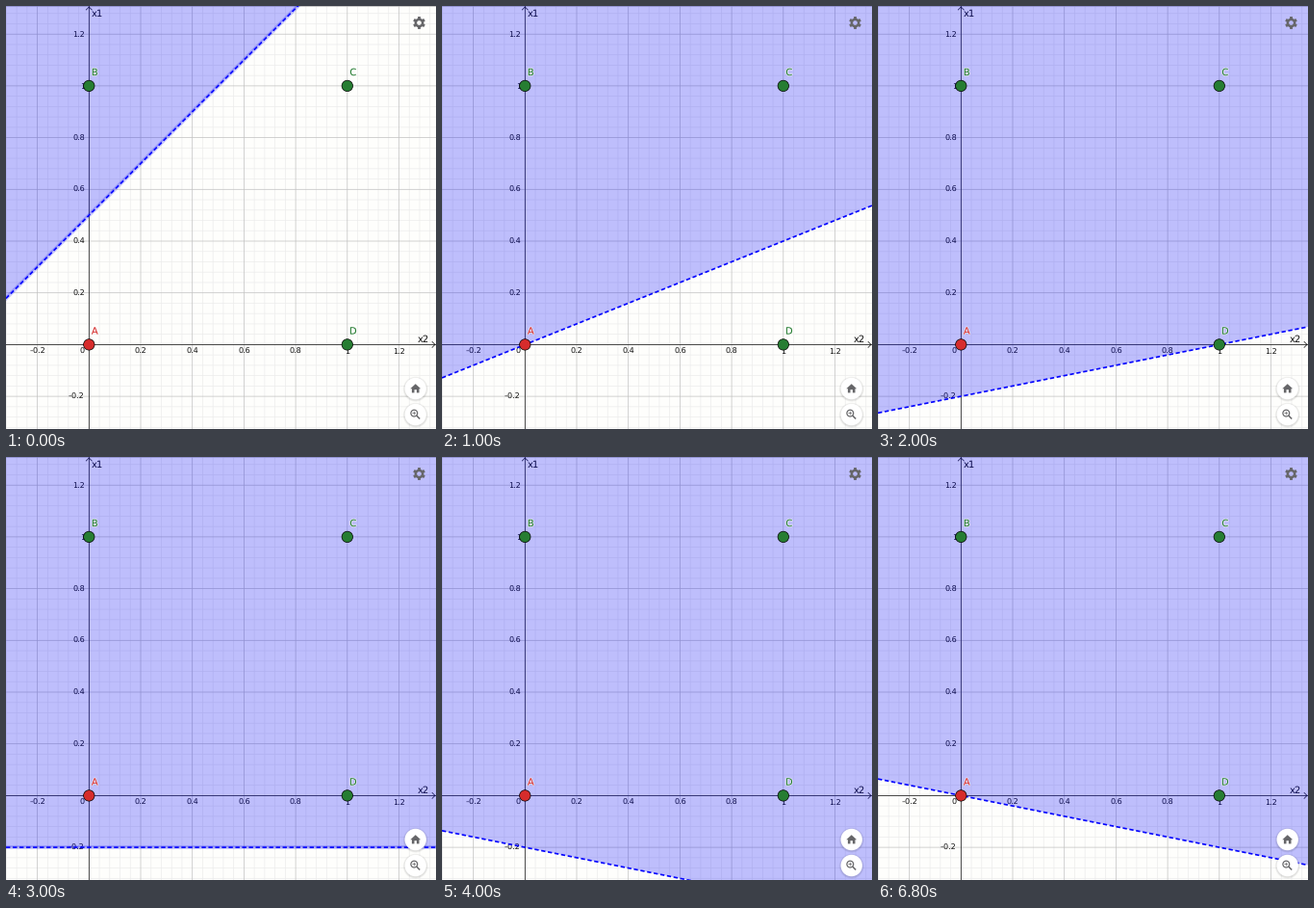
Write a matplotlib script that moves like this. It is 447x439 px and loops after 8000 ms.

```python
import numpy as np
import matplotlib.pyplot as plt
from matplotlib import patheffects
from matplotlib.animation import FuncAnimation
from matplotlib.patches import Circle, Polygon

plt.rcParams["font.family"] = "DejaVu Sans"
plt.rcParams["text.hinting"] = "none"

W, H, DPI = 447, 439, 64
PT = 72 / DPI                      # points per pixel
X0, Y0, UNIT = 86.3, 351.4, 268.5  # plot origin and scale in pixels
THIN = 0.7                         # hairline width in pixels

# (slope, intercept, highlighted) of the boundary, one per second
LINES = [(1, 0.5, True), (0.4, 0, False), (0.2, -0.2, False),
         (0, -0.2, True), (-0.2, -0.2, False), (-0.2, 0, False)]
STEPS = 8

PAPER, GREEN, RED, ICON = "#fefefc", "#267d32", "#d62c2c", "#666669"

fig = plt.figure(figsize=(W / DPI, H / DPI), dpi=DPI, facecolor=PAPER)
ax = fig.add_axes([0, 0, 1, 1])
ax.set_xlim(0, W)
ax.set_ylim(H, 0)
ax.axis("off")


def px(x):
    return X0 + UNIT * x


def py(y):
    return Y0 - UNIT * y


def stroke(xs, ys, color, width=THIN, z=1, **kw):
    return ax.plot(xs, ys, color=color, lw=width * PT, zorder=z,
                   snap=False, **kw)[0]


def label(x, y, text, size, color="#111111", ha="center", z=3, **kw):
    return ax.text(x, y, text, fontsize=size * PT, color=color, ha=ha,
                   va="baseline", zorder=z, **kw)


def disc(x, y, r, z, **kw):
    ax.add_patch(Circle((x, y), r, zorder=z, **kw))


def draw_grid():
    for i in range(-9, 36):
        major = i % 5 == 0
        color = "#c0c0c0" if major else "#ececec"
        z = 1.2 if major else 1
        x, y = px(i * 0.04), py(i * 0.04)
        if 0 <= x <= W:
            stroke([x, x], [0, H], color, z=z)
        if 0 <= y <= H:
            stroke([0, W], [y, y], color, z=z)
    stroke([0, W], [0.4, 0.4], "#b4b4b4", z=1.3)


def draw_axes():
    dark = "#101010"
    stroke([X0, X0], [0, H], dark, z=2)
    stroke([0, W], [Y0, Y0], dark, z=2)
    stroke([X0 - 3, X0, X0 + 3], [4, 1, 4], dark, z=2)
    stroke([W - 4, W - 1, W - 4], [Y0 - 3, Y0, Y0 + 3], dark, z=2)
    for i in range(-1, 7):
        if i == 0:
            continue
        v = i / 5
        text = f"{v:g}".replace("-", "\u2013")
        label(px(v), 361, text, 8)
        label(81.8, py(v) + 3, text, 8, ha="right")
    label(81.8, 361, "0", 8, ha="right")
    label(89, 11, "x1", 10, ha="left")
    label(440, 348.8, "x2", 10, ha="right")


def draw_points():
    halo = [patheffects.withStroke(linewidth=1.4 * PT,
                                   foreground="#ffffffb0")]
    for name, x, y, color in [("A", 0, 0, RED), ("B", 0, 1, GREEN),
                              ("C", 1, 1, GREEN), ("D", 1, 0, GREEN)]:
        disc(px(x), py(y), 5.7, 7, fc=color, ec="black", lw=THIN * PT)
        label(px(x) + 6, py(y) - 10.8, name, 10, color, z=8,
              path_effects=halo)


def draw_gear(x, y):
    disc(x, y, 3.6, 9, fill=False, ec=ICON, lw=2.5 * PT)
    for a in np.pi / 6 + np.arange(6) * np.pi / 3:
        c, s = np.cos(a), np.sin(a)
        stroke([x + 4 * c, x + 6.4 * c], [y + 4 * s, y + 6.4 * s],
               ICON, 3, 9, solid_capstyle="butt")


def draw_button(x, y):
    for r in (13, 12.4, 11.8):
        disc(x, y + 0.7, r, 9, fc="black", ec="none", alpha=0.04)
    disc(x, y, 11.2, 9.1, fc="white", ec="none")


def draw_controls():
    draw_gear(429.5, 17.5)
    x, y = 425.7, 397
    draw_button(x, y)
    half = [(0, -4.8), (5.4, 0.2), (3.8, 0.2), (3.8, 4.4), (1.2, 4.4),
            (1.2, 1.2)]
    house = half + [(-a, b) for a, b in half[:0:-1]]
    ax.add_patch(Polygon([(x + a, y + b) for a, b in house], fc=ICON,
                         ec="none", zorder=10))
    y = 424
    draw_button(x, y)
    cx, cy = x - 1.4, y - 1.4
    disc(cx, cy, 3.4, 10, fill=False, ec=ICON, lw=1.2 * PT)
    stroke([cx + 2.6, cx + 5.9], [cy + 2.6, cy + 5.9], ICON, 1.5, 10,
           solid_capstyle="butt")
    stroke([cx - 1.5, cx + 1.5], [cy, cy], ICON, THIN, 10)
    stroke([cx, cx], [cy - 1.5, cy + 1.5], ICON, THIN, 10)


draw_grid()
draw_axes()
draw_points()
draw_controls()

shade = Polygon([(0, 0), (W, 0), (W, 1)], fc="#0000ff", ec="none",
                alpha=0.25, zorder=4)
ax.add_patch(shade)
glow = stroke([], [], "#0000ff", 4, 5, alpha=0.2)
edge = stroke([], [], "#0000ff", 1.67, 6, dashes=(2.6, 1.6),
              dash_capstyle="butt")


def update(i):
    slope, offset, lit = LINES[min(i, len(LINES) - 1)]
    xs = np.array([0, W])
    ys = py(slope * (xs - X0) / UNIT + offset)
    shade.set_xy([(0, ys[0]), (W, ys[1]), (W, min(0, ys[1])), (0, 0)])
    edge.set_data(xs, ys)
    glow.set_data(xs, ys)
    glow.set_visible(lit)
    return shade, glow, edge


anim = FuncAnimation(fig, update, frames=STEPS, interval=1000,
                     init_func=lambda: update(0), repeat=True,
                     repeat_delay=0, blit=False)
plt.show()
```
